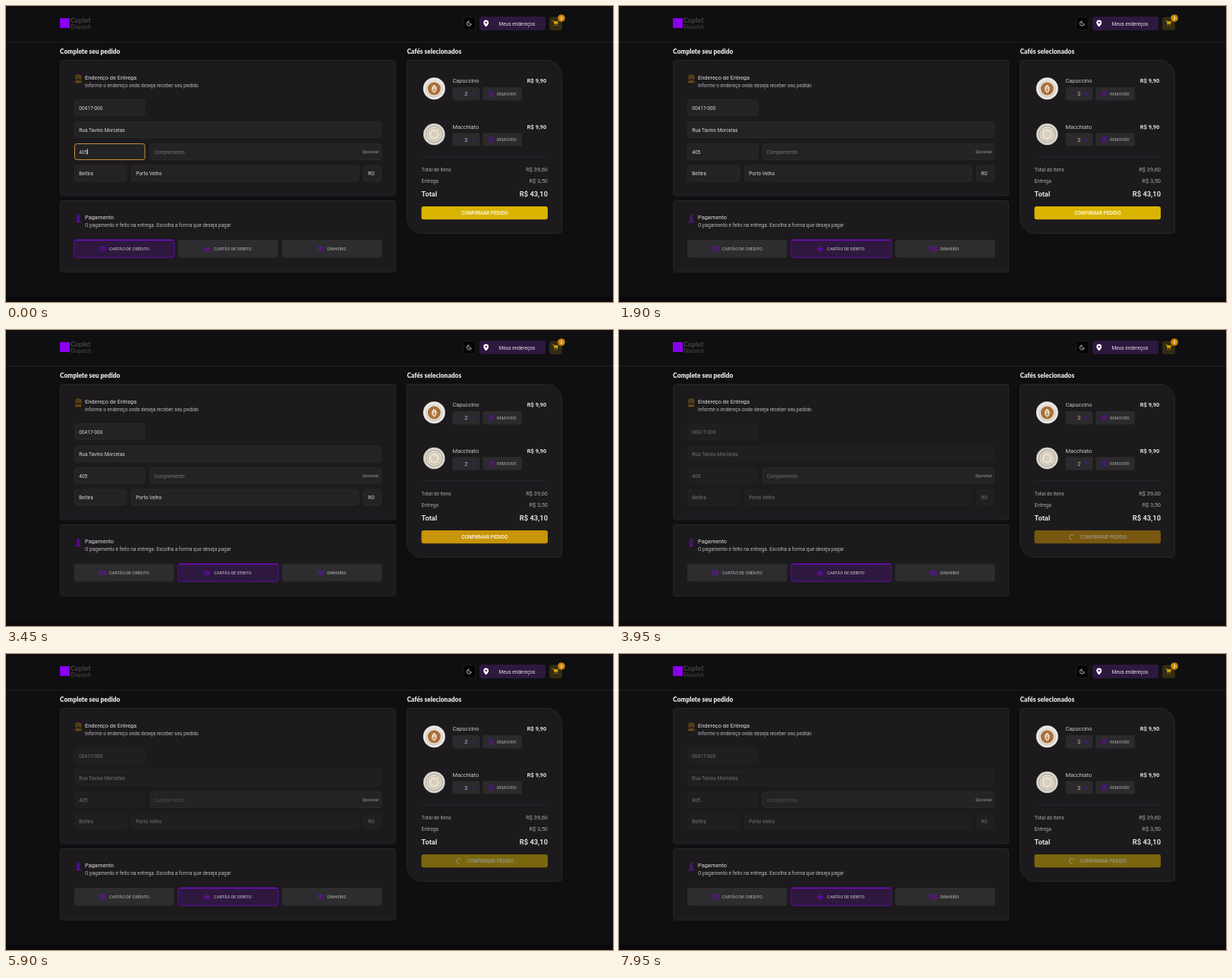
An HTML page with a canvas for the animation above (8 s loop, 800 px wide and 390 px high).

```html
<!DOCTYPE html>
<html lang="pt-BR">
<head>
<meta charset="utf-8">
<title>Pedido</title>
<style>
html, body { margin: 0; width: 100%; height: 100%; overflow: hidden; background: #0f0f11; }
canvas { display: block; width: 800px; height: 390px; }
</style>
</head>
<body>
<canvas id="stage" width="800" height="390"></canvas>
<script>
const ctx = document.getElementById('stage').getContext('2d');
const LOOP = 8000, STEP = 50;
const PURPLE = '#7a08cf', DIM_PURPLE = '#5f0f9c';
const SMALL = 5.57, BODY = 6.5, LARGE = 7.43, HUGE = 9.3;

const ramp = (t, from, to) => Math.min(1, Math.max(0, (t - from) / (to - from)));

// Colours are [r, g, b] when they need to be blended.
const mix = (a, b, k) => a.map((v, i) => v + (b[i] - v) * k);
const rgb = (c, alpha = 1) => `rgba(${c.map(Math.round).join(',')},${alpha})`;

function box(x, y, w, h, radius, fill, stroke) {
  ctx.beginPath();
  ctx.roundRect(x, y, w, h, radius);
  if (fill) { ctx.fillStyle = fill; ctx.fill(); }
  if (stroke) { ctx.strokeStyle = stroke; ctx.lineWidth = 1; ctx.stroke(); }
}

function disc(x, y, r, fill) {
  ctx.beginPath();
  ctx.arc(x, y, r, 0, Math.PI * 2);
  ctx.fillStyle = fill;
  ctx.fill();
}

// y is the middle of the capitals.
function label(str, x, y, size, color, { style = '400', align = 'left', family = 'Roboto' } = {}) {
  ctx.font = `${style} ${size}px ${family}, sans-serif`;
  ctx.textAlign = align;
  ctx.fillStyle = color;
  ctx.fillText(str, x, y + size * 0.355);
}

function icon(path, x, y, color, width = 0.9, fill = false) {
  ctx.save();
  ctx.translate(x, y);
  const shape = new Path2D(path);
  ctx.strokeStyle = ctx.fillStyle = color;
  ctx.lineWidth = width;
  ctx.lineJoin = ctx.lineCap = 'round';
  fill ? ctx.fill(shape, 'evenodd') : ctx.stroke(shape);
  ctx.restore();
}

const ICONS = {
  moon: 'M-.8-2.8A3 3 0 1 0 2.8 .8A2.9 2.9 0 0 1-.8-2.8Z',
  pin: 'M0 4.6C-2.3 2.2-3.4.3-3.4-1.1A3.4 3.4 0 0 1 3.4-1.1C3.4.3 2.3 2.2 0 4.6ZM1.2-1.1A1.2 1.2 0 1 0-1.2-1.1A1.2 1.2 0 1 0 1.2-1.1Z',
  cart: 'M-3.6-3H-2.4L-1.6 1H2.2L3-2H-2.2',
  money: 'M2-2.2C1.5-4-2-3.8-2-1.8C-2 .4 2-.4 2 1.8C2 3.8-1.8 3.8-2.2 2M0-4.6V4.6M-3 4.8H3',
  trash: 'M-3-2.4H3M-2.2-2.4V3.2H2.2V-2.4M-1-2.4V-3.5H1V-2.4M-.8-.8V1.6M.8-.8V1.6',
  card: 'M-3.4-2.4H3.4V2.4H-3.4ZM-3.4-.8H3.4M.8 1.1H2.2',
  bank: 'M-3.4-.7L0-3L3.4-.7ZM-2.4-.5V1.8M-.8-.5V1.8M.8-.5V1.8M2.4-.5V1.8M-3.4 2.5H3.4',
  cash: 'M-3.6-2.2H3.6V2.2H-3.6ZM1.1 0A1.1 1.1 0 1 0-1.1 0A1.1 1.1 0 1 0 1.1 0ZM-3.6-.8L-2.2-2.2M3.6.8L2.2 2.2',
};

function header() {
  ctx.fillStyle = '#0f0f11';
  ctx.fillRect(0, 0, 800, 390);
  ctx.fillStyle = '#0b0b0c';
  ctx.fillRect(0, 383, 800, 7);
  ctx.fillStyle = '#232325';
  ctx.fillRect(0, 47, 800, 1);

  ctx.fillStyle = '#8a00f0';
  ctx.fillRect(71, 16, 13, 13);
  label('Cuplet', 85, 18.5, 9, '#3d3d40', { style: '900', family: 'Lato' });
  label('Dispatch', 85, 28, 6.8, '#38383b', { style: '900', family: 'Lato' });

  box(602.5, 14.5, 16.5, 17, 3, '#050506', '#1d1d1f');
  icon(ICONS.moon, 610.5, 23, '#dddddd', 0.8);
  box(624, 14, 87, 18, 3, '#2d183f');
  icon(ICONS.pin, 632.7, 23, '#ffffff', 1, true);
  label('Meus endereços', 649.5, 23.2, BODY, '#e4e0e8');
  box(716, 14.5, 17, 17.5, 3, '#332b13');
  icon(ICONS.cart, 724.5, 22.6, '#c9a206', 0.9);
  ctx.fillStyle = '#c9a206';
  ctx.fillRect(722.5, 20.6, 4.5, 2.6);
  disc(723.2, 25.4, 0.7, '#c9a206');
  disc(726.4, 25.4, 0.7, '#c9a206');
  disc(732, 16, 4.8, '#cb860c');
  label('2', 732, 16, SMALL, '#ffffff', { align: 'center', style: '500' });
}

function addressCard(t) {
  const disabled = t >= 3950;
  const focused = t < 900;
  const textColor = disabled ? '#747475' : '#d9d9da';

  const field = (x, y, w, str) => {
    box(x + 0.5, y + 0.5, w - 1, 21, 3, disabled ? '#1f1e20' : '#232325', disabled ? '#212022' : '#28282a');
    label(str, x + 6.3, y + 11.2, BODY, textColor);
  };

  box(71.5, 71.5, 442, 178.5, 3, '#1c1a1d', '#272528');
  icon(ICONS.pin, 95.3, 95.2, '#b87908', 0.8);
  icon('M-2.4 4H-3.6V5.4H3.6V4H2.4', 95.3, 95.2, '#b87908', 0.7);
  label('Endereço de Entrega', 104, 94.6, LARGE, '#dededf');
  label('Informe o endereço onde deseja receber seu pedido', 104, 104.6, BODY, '#b9b9bb');

  field(90, 123, 93.5, '00417-000');
  field(90, 152, 405, 'Rua Tavino Morcelas');
  field(90, 181, 93.5, '405');
  field(90, 209.5, 69.5, 'Beltira');
  field(165, 209.5, 300.5, 'Porto Velho');
  field(471, 209.5, 24, 'RO');

  if (focused) box(90.5, 181.5, 92.5, 21, 3, null, '#c58e38');
  if (t < 350) {
    ctx.fillStyle = '#e6e6e6';
    ctx.fillRect(107, 188, 0.8, 7.5);
  }

  box(189.5, 181.5, 305, 21, 3, '#232325', '#28282a');
  const hint = mix([117, 117, 119], [78, 78, 80], ramp(t, 3900, 4150));
  label('Complemento', 194.7, 192.2, BODY, rgb(hint));
  label('Opcional', 491, 192, SMALL, '#a3a3a5', { style: 'italic 400', align: 'right' });
}

function payButton(x, shape, str, selected, outline, hover, iconX, textX) {
  const fill = mix(mix([45, 45, 48], [50, 49, 54], hover), [46, 24, 63], selected);
  box(x, 308, 131.5, 23.5, 3, rgb(fill));
  if (outline > 0) {
    ctx.globalAlpha = outline;
    box(x - 0.3, 308.3, 132.3, 23, 3, null, '#5d0da3');
    ctx.fillStyle = '#8206de';
    ctx.fillRect(x + 1, 307.8, 130, 1.2);
    ctx.globalAlpha = 1;
  }
  icon(shape, iconX, 320, PURPLE, 0.7);
  label(str, textX, 320, SMALL, rgb(mix([190, 190, 192], [208, 208, 210], Math.max(hover, selected))));
}

function paymentCard(t) {
  box(71.5, 256.5, 442, 94, 3, '#1c1a1d', '#272528');
  icon(ICONS.money, 95.3, 279.8, PURPLE, 0.9);
  label('Pagamento', 104, 278.8, LARGE, '#dededf');
  label('O pagamento é feito na entrega. Escolha a forma que deseja pagar', 104, 289, BODY, '#b9b9bb');

  const swap = ramp(t, 950, 1150);
  const debitHover = ramp(t, 500, 650) * (1 - ramp(t, 1650, 1800));
  const cashHover = ramp(t, 1650, 1750) * (1 - ramp(t, 1800, 1900));
  payButton(90, ICONS.card, 'CARTÃO DE CRÉDITO', 1 - swap, 1 - ramp(t, 850, 1000), 0, 126.8, 136);
  payButton(227, ICONS.bank, 'CARTÃO DE DÉBITO', swap, swap, debitHover, 265, 274.3);
  payButton(364, ICONS.cash, 'DINHEIRO', 0, 0, cashHover, 414.5, 423.3);
}

function cappuccino(x, y) {
  disc(x, y, 14.5, '#e9e7e3');
  disc(x, y + 0.5, 11, '#cfc8bf');
  disc(x, y, 9.8, '#f4f0e9');
  disc(x, y, 8.6, '#a9713d');
  icon('M0 6C-5 2-4-2 0-5C4-2 5 2 0 6Z', x, y, '#f1e2cb', 1, true);
  icon('M0 4V-2M-2 1L0 2.5L2 1', x, y, '#a9713d', 0.9);
}

function macchiato(x, y) {
  disc(x, y, 14.3, '#d6d3cb');
  disc(x, y, 11, '#aaa494');
  disc(x, y, 10, '#eeeae0');
  disc(x, y, 8.6, '#b9ab91');
  disc(x, y, 7.6, '#e6dfcf');
  disc(x, y + 0.3, 4, '#d8cfbb');
}

function item(name, y, drawCup) {
  drawCup(564.3, y + 10);
  label(name, 588.4, y, LARGE, '#c9c9cb');
  label('R$ 9,90', 712.3, y, LARGE, '#dededf', { style: '700', align: 'right' });
  box(588.5, y + 8.3, 36, 17.5, 3, '#2b2a2d');
  icon('M-2 0H2', 597.3, y + 17, '#431264', 0.8);
  label('2', 606.4, y + 17, LARGE, '#c4c4c6', { align: 'center' });
  icon('M-2 0H2M0-2V2', 616.2, y + 17, DIM_PURPLE, 0.8);
  box(628.3, y + 8.3, 51.5, 17.5, 3, '#2b2a2d');
  icon(ICONS.trash, 639.7, y + 17, DIM_PURPLE, 0.9);
  label('REMOVER', 647, y + 17.2, SMALL, '#adadaf');
}

function amount(name, value, y, nameSize, valueSize, color, style) {
  label(name, 547.6, y, nameSize, color, { style });
  label(value, 714, y, valueSize, color, { style, align: 'right' });
}

function confirmButton(t) {
  const yellow = [217, 180, 0], hover = [200, 148, 8], card = [28, 26, 29];
  const loading = t >= 3950;
  if (!loading) {
    box(547.5, 264, 166.5, 17.3, 3, rgb(mix(yellow, hover, ramp(t, 3250, 3450))));
    label('CONFIRMAR PEDIDO', 630.8, 272.8, BODY, '#fffdf2', { style: '500', align: 'center' });
    return;
  }
  const base = mix([212, 150, 0], yellow, ramp(t, 3950, 4150));
  box(547.5, 264, 166.5, 17.3, 3, rgb(mix(card, base, 0.5)));
  const turn = (t - 3950) / 1000 * Math.PI * 2;
  ctx.beginPath();
  ctx.arc(596.7, 272.9, 3.2, turn + 1.5, turn + 5.8);
  ctx.strokeStyle = '#99968a';
  ctx.lineWidth = 0.9;
  ctx.stroke();
  label('CONFIRMAR PEDIDO', 638.5, 272.8, BODY, '#99968a', { style: '500', align: 'center' });
}

function orderCard(t) {
  box(528.5, 71.5, 204, 228, [3, 20, 3, 20], '#1c1a1d', '#272528');
  item('Capuccino', 98.8, cappuccino);
  item('Macchiato', 159, macchiato);
  ctx.fillStyle = '#272529';
  ctx.fillRect(548, 198, 166, 1);
  amount('Total de itens', 'R$ 39,60', 215.4, BODY, LARGE, '#a9a9ab', '400');
  amount('Entrega', 'R$ 3,50', 230.6, BODY, LARGE, '#a9a9ab', '400');
  amount('Total', 'R$ 43,10', 247.2, HUGE, HUGE, '#dededf', '700');
  confirmButton(t);
}

function draw(now) {
  const t = Math.floor((now % LOOP) / STEP) * STEP;
  const heading = { style: '900', family: 'Lato' };
  header();
  label('Complete seu pedido', 71, 59.8, 8.4, '#e6e6e7', heading);
  label('Cafés selecionados', 528.6, 59.8, 8.4, '#e6e6e7', heading);
  addressCard(t);
  paymentCard(t);
  orderCard(t);
  requestAnimationFrame(draw);
}
requestAnimationFrame(draw);
</script>
</body>
</html>
```
